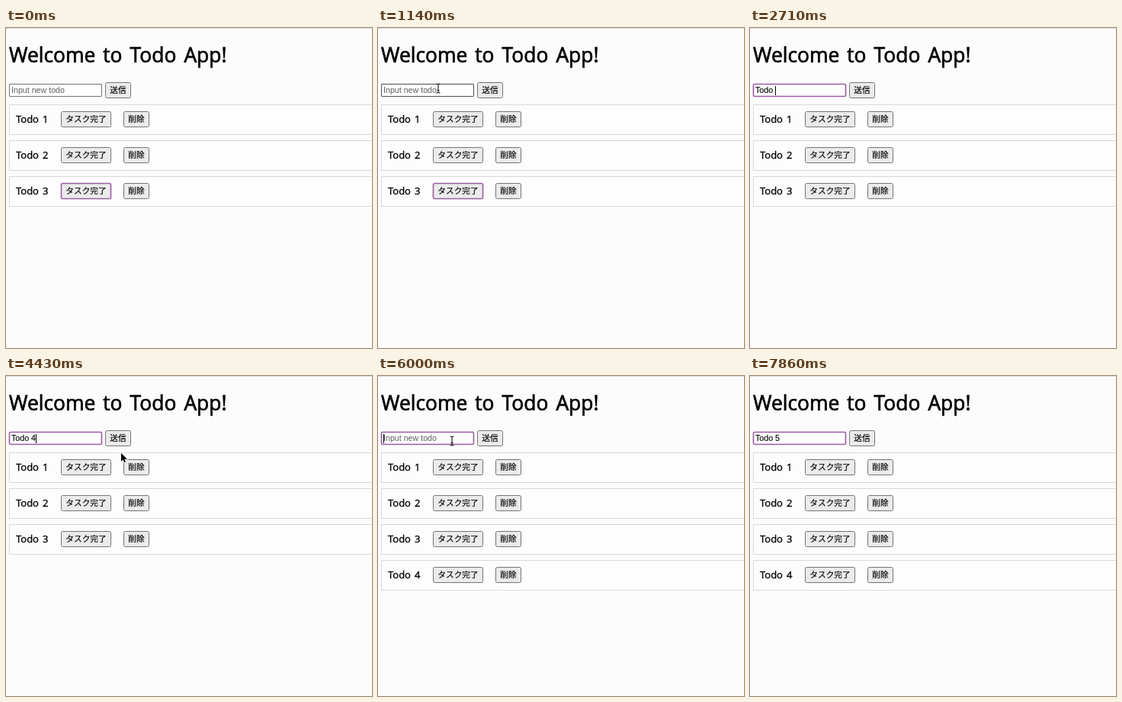
An HTML page that plays this animation: 480 by 419 pixels, repeating every 8 s.

```html
<!DOCTYPE html>
<html lang="ja">
<head>
<meta charset="utf-8">
<title>Todo App</title>
<style>
  html, body { margin: 0; width: 100%; height: 100%; overflow: hidden; background: #fcfcfc; }
  svg { display: block; width: 480px; height: 419px; }
  text { white-space: pre; stroke: #000; }
  .title, .name { font-family: "Open Sans", "Noto Sans", sans-serif; word-spacing: .12em; }
  .title { font-size: 26.4px; stroke-width: .7px; }
  .name { font-size: 13px; stroke-width: .35px; }
  .label { font: 10.67px "Noto Sans CJK JP", "Noto Sans CJK", sans-serif; text-anchor: middle; stroke-width: .2px; }
  .field { font: 10.67px "Liberation Sans", Arial, sans-serif; stroke-width: .15px; }
  .hint { fill: #5e5e5e; stroke: none; }
</style>
</head>
<body>
<svg id="stage" viewBox="0 0 480 419" xmlns="http://www.w3.org/2000/svg"></svg>
<script>
const LOOP = 8000;
const TICKS_PER_MS = 0.007; // the screen refreshes seven times a second
const PURPLE = '#9c5ba5';
const GRAY = '#747474';
const stage = document.getElementById('stage');

function add(parent, tag, attrs, text) {
  const el = document.createElementNS('http://www.w3.org/2000/svg', tag);
  set(el, attrs);
  if (text) el.textContent = text;
  parent.appendChild(el);
  return el;
}

function set(el, attrs) {
  for (const key in attrs) el.setAttribute(key, attrs[key]);
}

function show(el, on) {
  el.style.display = on ? '' : 'none';
}

function button(parent, x, y, w, label) {
  const box = add(parent, 'rect', {
    x: x + .5, y: y + .5, width: w - 1, height: 20, rx: 2, fill: '#ebebeb', stroke: GRAY
  });
  add(parent, 'text', { x: x + w / 2, y: y + 14.3, class: 'label' }, label);
  return box;
}

function todoRow(i) {
  const y = 100 + 47 * i;
  const row = add(stage, 'g', {});
  add(row, 'rect', { x: 4.5, y: y + .5, width: 500, height: 39, fill: '#fdfdfd', stroke: '#d9d9d9' });
  add(row, 'text', { x: 13, y: y + 24, class: 'name' }, 'Todo ' + (i + 1));
  const done = button(row, 72, y + 9, 66, 'タスク完了');
  button(row, 154, y + 9, 34, '削除');
  return { row, done };
}

add(stage, 'rect', { width: 480, height: 419, fill: '#fcfcfc' });
add(stage, 'rect', { width: 480, height: 1, fill: '#dcdcdc' });
add(stage, 'text', { x: 4, y: 44.5, class: 'title' }, 'Welcome to Todo App!');

const field = add(stage, 'rect', { x: 4.5, y: 73.5, width: 121, height: 16, fill: '#fff' });
const hint = add(stage, 'text', { x: 7, y: 85.3, class: 'field hint' }, 'Input new todo');
const typed = add(stage, 'text', { x: 7, y: 85.3, class: 'field' });
const caret = add(stage, 'rect', { y: 76, width: 1, height: 12 });
const send = button(stage, 130, 71, 34, '送信');
const rows = [0, 1, 2, 3].map(todoRow);

const arrow = add(stage, 'path', {
  d: 'M0 0V10.8L2.5 8.5L4.2 12.2L6 11.4L4.3 7.8H7.8Z',
  stroke: '#fff', 'stroke-width': 1.5, 'paint-order': 'stroke'
});
const beam = add(stage, 'path', {
  d: 'M-2.5-6Q0-6 0-4.5Q0-6 2.5-6M0-4.5V4.5M-2.5 6Q0 6 0 4.5Q0 6 2.5 6M-1.5 2.5H1.5',
  fill: 'none', stroke: '#111', 'stroke-width': 1.1
});

// All times below are in ticks.
const typing = [
  [0, ''], [14, 'T'], [16, 'Tod'], [17, 'Todo'], [19, 'Todo '], [21, 'Todo 4'],
  [39, ''], [45, 'T'], [46, 'To'], [48, 'Todo'], [49, 'Todo '], [52, 'Todo 5']
];
const focusSpans = [[9, 38], [42, 56]];
const caretSpans = [[9, 13], [14, 25], [28, 32], [35, 38], [42, 55]];
const pointerPaths = [
  [[1, 468, 2], [3, 330, 40], [5, 170, 82], [7, 88, 80], [8, 79, 79], [9, 79, 79], [12, 4, 86], [13, 2, 88]],
  [[31, 151, 101], [33, 167, 103], [36, 149, 86], [38, 147, 84], [39, 147, 84], [42, 97, 85], [44, 97, 85]]
];

const within = (spans, t) => spans.some(([a, b]) => t >= a && t < b);

function pointerAt(t) {
  const path = pointerPaths.find(p => t >= p[0][0] && t <= p[p.length - 1][0]);
  if (!path) return null;
  const i = Math.max(1, path.findIndex(p => p[0] >= t));
  const [t0, x0, y0] = path[i - 1];
  const [t1, x1, y1] = path[i];
  const k = (t - t0) / (t1 - t0);
  return { x: x0 + (x1 - x0) * k, y: y0 + (y1 - y0) * k };
}

const inside = (p, x0, y0, x1, y1) => !!p && p.x >= x0 && p.x <= x1 && p.y >= y0 && p.y <= y1;

function render(ms) {
  const t = Math.floor(ms * TICKS_PER_MS + .05);
  const pointer = pointerAt(t);
  const focused = within(focusSpans, t);
  const overField = inside(pointer, 4, 73, 126, 90);
  const overSend = inside(pointer, 130, 71, 164, 92);
  const text = typing.filter(([at]) => at <= t).pop()[1];

  typed.textContent = text;
  show(hint, !text);
  show(caret, within(caretSpans, t));
  caret.setAttribute('x', Math.round(7 + (text ? typed.getComputedTextLength() : 0)));

  set(field, {
    stroke: focused ? PURPLE : overField ? '#505050' : GRAY,
    'stroke-width': focused ? 1.6 : 1,
    rx: focused ? 1.5 : .5
  });
  set(send, { fill: overSend ? '#dedede' : '#ebebeb', stroke: overSend ? '#555' : GRAY });
  const ringed = t < 9;
  set(rows[2].done, { stroke: ringed ? PURPLE : GRAY, 'stroke-width': ringed ? 1.6 : 1 });
  show(rows[3].row, t >= 39);

  show(arrow, pointer && !overField);
  show(beam, overField);
  if (pointer) {
    const move = `translate(${pointer.x} ${pointer.y})`;
    arrow.setAttribute('transform', move);
    beam.setAttribute('transform', move);
  }
}

const start = performance.now();
function loop() {
  render((performance.now() - start) % LOOP);
  requestAnimationFrame(loop);
}
loop();
</script>
</body>
</html>
```
